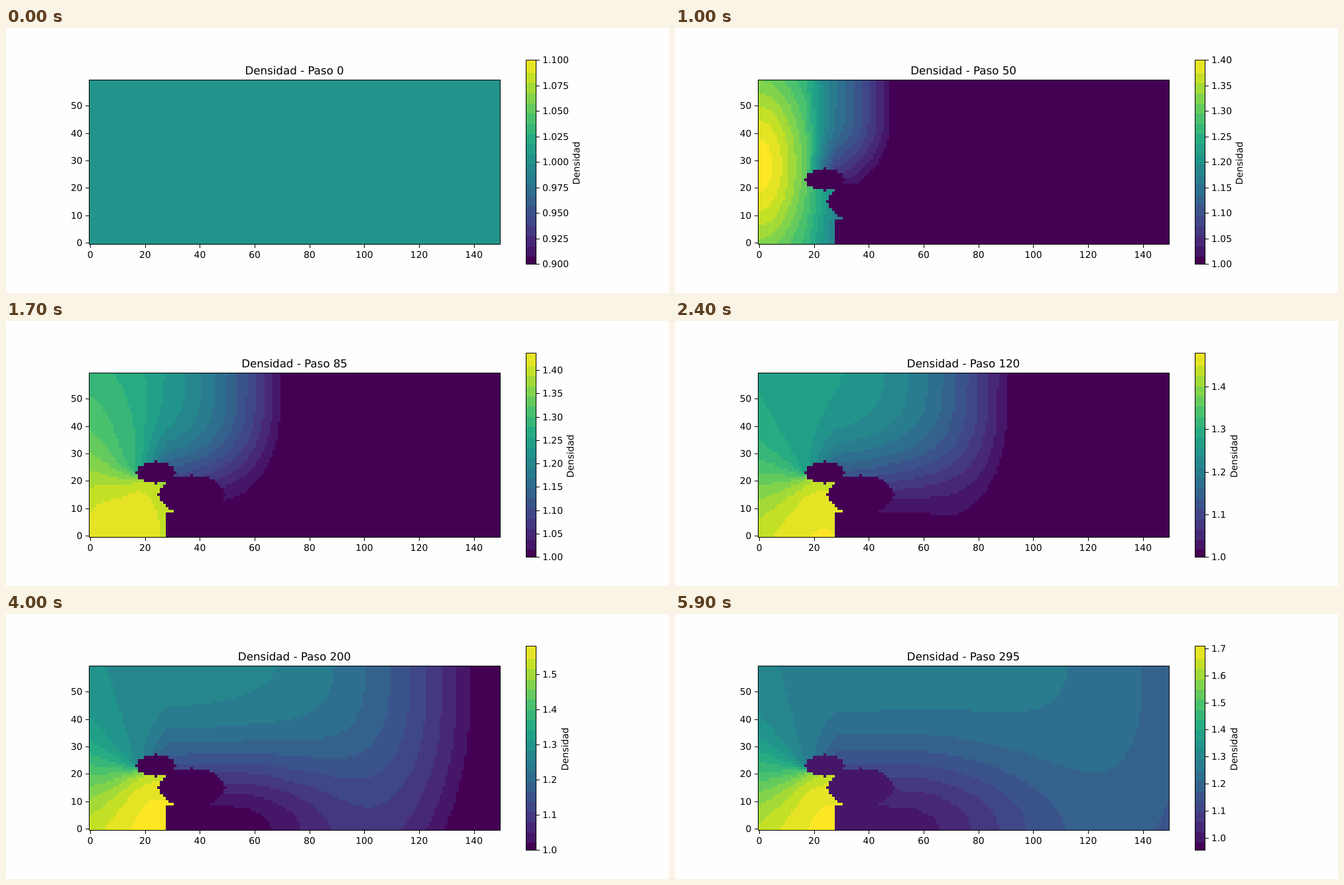
An HTML page with a canvas for the animation above (6 s loop, 1000x400 px).

```html
<!DOCTYPE html>
<html lang="es">
<head>
<meta charset="utf-8">
<title>Densidad</title>
<style>
html, body { margin: 0; width: 100%; height: 100%; overflow: hidden; background: #fefefe; }
canvas { display: block; }
</style>
</head>
<body>
<canvas id="stage" width="1000" height="400"></canvas>
<script>
const ctx = document.getElementById('stage').getContext('2d');
const { tanh, exp, hypot, min, max, round, floor, PI } = Math;
const NX = 150, NY = 60, CELL = 620 / NX;
const LEFT = 125, TOP = 78, RIGHT = 745, BOTTOM = 326;
const BAR = { x: 784, w: 15, top: 48, h: 308 };
const viridis = [
  [68, 1, 84], [72, 36, 117], [65, 68, 135], [53, 95, 141], [42, 120, 142], [33, 145, 140],
  [34, 168, 132], [68, 191, 112], [122, 209, 81], [189, 223, 38], [253, 231, 37]
];

const lerp = (a, b, p) => a + (b - a) * p;
const clamp = v => max(0, min(1, v));

// Colour bands, 0.05 of the scale each
const bands = Array.from({ length: 21 }, (_, k) => {
  const q = min(k * 0.5 + (k ? 0.11 : 0), 9.999), i = floor(q);
  return `rgb(${viridis[i].map((c, j) => round(lerp(c, viridis[i + 1][j], q - i)))})`;
});
const bandColor = t => bands[max(0, min(20, floor((t + 0.014) / 0.05)))];

// Highest excess density at a few steps
const peaks = [[0, 0], [20, 0.2026], [50, 0.4003], [85, 0.437], [160, 0.528], [245, 0.642], [295, 0.71]];

function scaleAt(step) {
  if (!step) return { lo: -0.1, hi: 0.1 };
  const i = peaks.findIndex(p => p[0] >= step);
  const [s0, v0] = peaks[i - 1], [s1, v1] = peaks[i];
  return { lo: min(0, (208 - step) * 0.00052), hi: lerp(v0, v1, (step - s0) / (s1 - s0)) };
}

const inEllipse = (x, y, cx, cy, rx, ry) => ((x - cx) / rx) ** 2 + ((y - cy) / ry) ** 2 <= 1;
const solid = (x, y) =>
  inEllipse(x, y, 24, 23, 7, 4) || inEllipse(x, y, 37, 15, 12, 7) || (x >= 28 && x < 48 && y < 9);

// Excess density: a wave leaving the left chamber, an early pulse inside it,
// and pressure that builds up below the tip of the head at (17, 23)
function density(x, y, step) {
  if (!step || solid(x, y)) return 0;
  const inside = x < 17 || (y < 23 && x < 31);
  const out = inside ? 0 : clamp((x - 17) / 11);

  const drop = max(0, min(45, 20 + step / 2) - y) * out;
  const behind = max(0, 2 + 0.615 * step - hypot(max(0, x - 17), drop));
  const clear = (y * y / 1000 + (max(0, x - 50) / 60) ** 2) * (1 + 60 / step);
  const wave = 0.28 * tanh(behind / (34 + step * step / 3000)) * (1 - out * exp(-clear));

  const cx = max(0, 13 - 0.26 * step);
  const pulse = 0.2 * exp(-(((step - 50) / 30) ** 2) - ((x - cx) / 20) ** 2 - ((y - 28) / 40) ** 2)
    * tanh(behind / 10) * (1 - out);

  let build = 0;
  if (inside) {
    let turn = Math.atan2(17 - x, y - 23);
    if (turn < 0) turn += 2 * PI;
    const r = hypot(x - 17, y - 23);
    build = (0.06 + 0.0014 * step) * clamp((step - 50) / 35)
      * (1 - Math.cos(turn * 180 / 205)) / 2 * r / (r + 2);
  }
  return wave + pulse + build;
}

function drawField(step, { lo, hi }) {
  const edge = i => round(i * CELL);
  for (let x = 0; x < NX; x++) {
    for (let y = 0; y < NY; y++) {
      ctx.fillStyle = bandColor((density(x, y, step) - lo) / (hi - lo));
      ctx.fillRect(LEFT + edge(x), BOTTOM - edge(y + 1),
        edge(x + 1) - edge(x), edge(y + 1) - edge(y));
    }
  }
}

function text(s, x, y, align, size = 13.89) {
  ctx.font = `${size}px "DejaVu Sans", sans-serif`;
  ctx.textRendering = 'geometricPrecision';
  ctx.textAlign = align;
  ctx.fillText(s, x, y);
}

function drawAxes(step) {
  ctx.fillStyle = '#000';
  ctx.strokeRect(LEFT + 0.5, TOP + 0.5, RIGHT - LEFT, BOTTOM - TOP);
  for (let v = 0; v < NX; v += 20) {
    const x = LEFT + (v + 0.5) * CELL;
    ctx.fillRect(round(x), BOTTOM, 1, 6);
    text(v, x, 347, 'center');
  }
  for (let v = 0; v < NY; v += 10) {
    const y = round(BOTTOM - (v + 0.5) * CELL);
    ctx.fillRect(LEFT - 5, y, 5, 1);
    text(v, 115.3, y + 5, 'right');
  }
  text(`Densidad - Paso ${step}`, 435, 70, 'center', 16.67);
}

function drawBar({ lo, hi }) {
  const { x, w, top, h } = BAR, range = hi - lo;
  for (let i = 0; i < h; i++) {
    ctx.fillStyle = bandColor((i + 0.5) / h);
    ctx.fillRect(x, top + h - 1 - i, w, 1);
  }
  ctx.strokeRect(x + 0.5, top + 0.5, w, h);
  ctx.fillStyle = '#000';
  const gap = [0.005, 0.01, 0.02, 0.025, 0.05, 0.1].find(s => s >= range / 9);
  const digits = gap === 0.1 ? 1 : gap * 100 % 1 ? 3 : 2;
  for (let n = Math.ceil(lo / gap - 1e-6); n * gap <= hi + 1e-6; n++) {
    const y = round(top + h - (n * gap - lo) / range * h);
    ctx.fillRect(x + w, y, 6, 1);
    text((1 + n * gap).toFixed(digits), 809.1, y + 5, 'left');
  }
  ctx.save();
  ctx.translate(838.7 + digits * 8.84, 204);
  ctx.rotate(-PI / 2);
  text('Densidad', 0, 0, 'center');
  ctx.restore();
}

let shown = -1;
function frame(now) {
  const step = floor(now % 6000 / 100) * 5;
  if (step !== shown) {
    shown = step;
    const scale = scaleAt(step);
    ctx.fillStyle = '#fefefe';
    ctx.fillRect(0, 0, 1000, 400);
    ctx.strokeStyle = '#000';
    ctx.lineWidth = 1;
    drawField(step, scale);
    drawAxes(step);
    drawBar(scale);
  }
  requestAnimationFrame(frame);
}
frame(performance.now());
</script>
</body>
</html>
```
